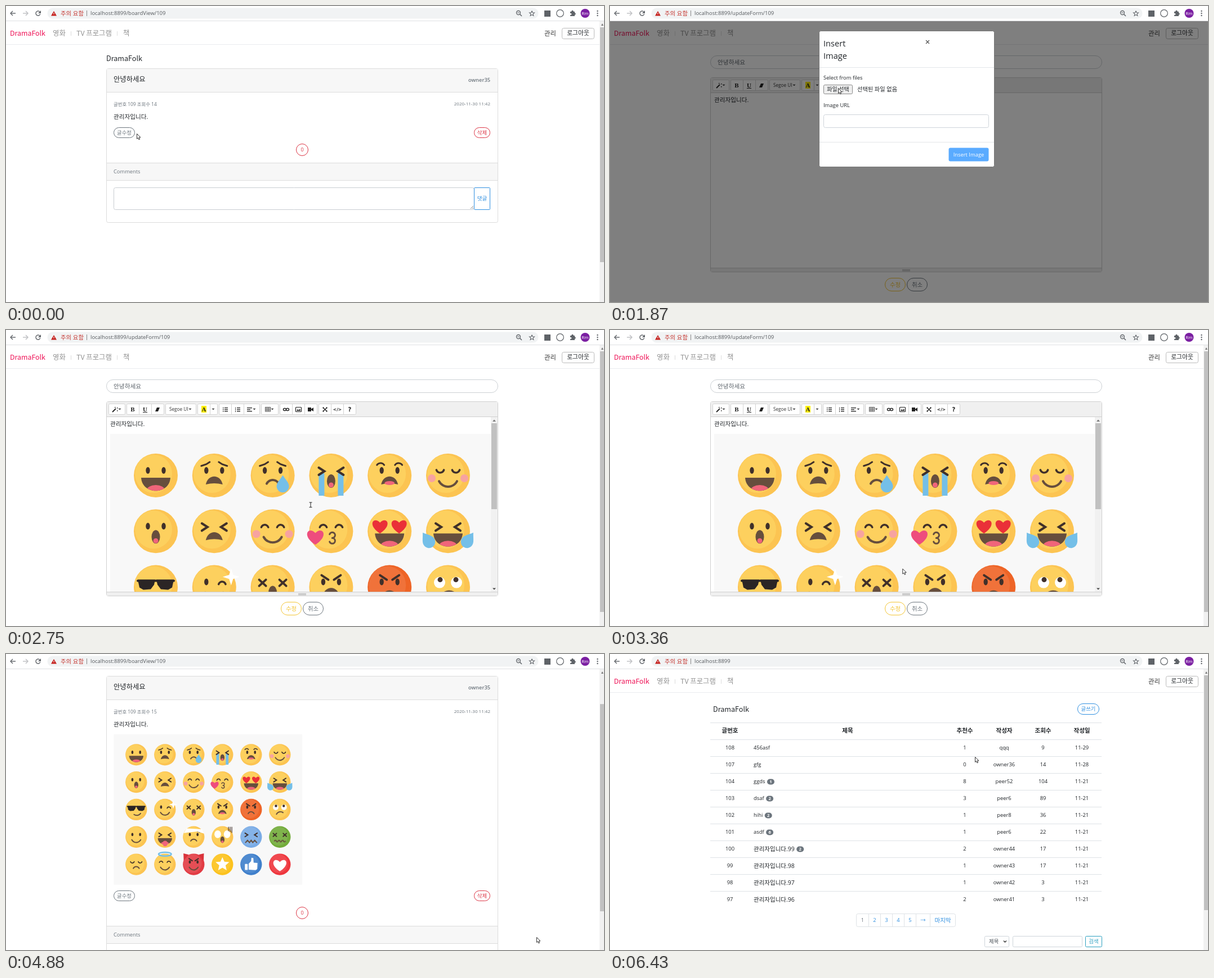
An HTML page with a canvas for the animation above (6.65 s loop, 1062 px wide and 527 px high).

```html
<!DOCTYPE html>
<html lang="ko">
<head>
<meta charset="utf-8">
<title>게시판</title>
<style>
html,body{margin:0;width:100%;height:100%;overflow:hidden;background:#fff}
canvas{display:block;width:100vw;height:100vh}
</style>
</head>
<body>
<canvas id="stage" width="1062" height="527"></canvas>
<script>
const c = document.getElementById('stage').getContext('2d');
const LOOP = 6650, BRAND = 'DramaFolk', WRITER = 'owner35';
const CJK = '"Noto Sans CJK KR","Noto Sans CJK JP","Noto Sans CJK",sans-serif';
const SANS = '"Open Sans",' + CJK;
const INK = '#212529', GREY = '#6c757d', RED = '#dc3545', BLUE = '#2f8fe0', EDGE = '#dcdcdc', GOLD = '#f3c534';

// ---- drawing helpers ----
function txt(s, x, y, size, col = INK, align = 'left', weight = 400, font = SANS) {
  c.font = `${weight} ${size}px ${font}`;
  c.textAlign = align;
  c.fillStyle = col;
  c.fillText(s, x, y + size * .36);
}
function rect(x0, y0, x1, y1, col) { c.fillStyle = col; c.fillRect(x0, y0, x1 - x0, y1 - y0); }
function box(x0, y0, x1, y1, r, fill, stroke, w = 1) {
  c.beginPath();
  c.roundRect(x0 + .5, y0 + .5, x1 - x0 - 1, y1 - y0 - 1, r);
  if (fill) { c.fillStyle = fill; c.fill(); }
  if (stroke) { c.strokeStyle = stroke; c.lineWidth = w; c.stroke(); }
}
function trace(p) {
  c.beginPath();
  for (let i = 0; i < p.length; i += 2) c.lineTo(p[i], p[i + 1]);
}
function line(col, w, ...p) { trace(p); c.strokeStyle = col; c.lineWidth = w; c.stroke(); }
function poly(col, ...p) { trace(p); c.closePath(); c.fillStyle = col; c.fill(); }
function ell(x, y, rx, ry, col) { c.beginPath(); c.ellipse(x, y, rx, ry, 0, 0, 7); c.fillStyle = col; c.fill(); }
function arc(x, y, r, a, b, col, w) {
  c.beginPath(); c.arc(x, y, r, a * Math.PI, b * Math.PI);
  c.strokeStyle = col; c.lineWidth = w; c.stroke();
}
function at(x, y, k, f) { c.save(); c.translate(x, y); c.scale(k, k); f(); c.restore(); }
function caret(x, y, col = '#333', s = 2.5) { poly(col, x - s, y - s / 2, x + s, y - s / 2, x, y + s / 2); }
function pill(s, x0, y0, x1, y1, size, col, r = 99) {
  box(x0, y0, x1, y1, r, '#fff', col);
  txt(s, (x0 + x1) / 2, (y0 + y1) / 2, size, col, 'center');
}
function shadow(f, blur = 8) { c.save(); c.shadowColor = 'rgba(0,0,0,.4)'; c.shadowBlur = blur; c.shadowOffsetY = 2; f(); c.restore(); }

// Values eased between [time, value...] keys
function track(keys, t) {
  let i = keys.length - 1;
  while (i > 0 && keys[i][0] > t) i--;
  const a = keys[i], b = keys[i + 1] || a;
  const u = b === a ? 0 : Math.max(0, (t - a[0]) / (b[0] - a[0]));
  const e = u * u * (3 - 2 * u);
  return a.slice(1).map((v, n) => v + (b[n + 1] - v) * e);
}
const within = (t, ...spans) => spans.some(([a, b]) => t >= a && t < b);

// ---- emoji sheet ----
const EYE = '#40302a', MOUTH = '#664e3d', PINK = '#f0657a', TEAR = '#74bfe8';
function pair(f) { for (const s of [-1, 1]) { c.save(); c.scale(s, 1); f(); c.restore(); } }
function heart(x, y, s, col) {
  at(x, y, s, () => {
    c.beginPath(); c.moveTo(0, 1);
    c.bezierCurveTo(-2, -.3, -.9, -1.6, 0, -.6);
    c.bezierCurveTo(.9, -1.6, 2, -.3, 0, 1);
    c.fillStyle = col; c.fill();
  });
}
function drop(x, y, s, tilt = 0) {
  at(x, y, s, () => {
    c.rotate(tilt);
    c.beginPath(); c.moveTo(0, -1.6);
    c.bezierCurveTo(.5, -.8, 1, -.4, 1, .2);
    c.arc(0, .2, 1, 0, Math.PI);
    c.bezierCurveTo(-1, -.4, -.5, -.8, 0, -1.6);
    c.fillStyle = TEAR; c.fill();
  });
}
function spikes(n, r1, r2) {
  const p = [];
  for (let i = 0; i <= 2 * n; i++) {
    const a = i * Math.PI / n - Math.PI / 2, r = i % 2 ? r2 : r1;
    p.push(Math.cos(a) * r, Math.sin(a) * r);
  }
  return p;
}
function star(n, r1, r2, col) { poly(col, ...spikes(n, r1, r2)); }
const part = {
  dot() { pair(() => ell(14, -9, 3.7, 6, EYE)); },
  squint() { pair(() => line(EYE, 4, 22, -14, 12, -7.5, 22, -1)); },
  hat() { pair(() => arc(14, -5, 6.5, 1.1, 1.9, EYE, 3.5)); },
  lid() { pair(() => arc(14, -12, 7, .1, .9, EYE, 3.5)); },
  cross() { pair(() => { line(EYE, 4, 12, -13, 24, -2); line(EYE, 4, 24, -13, 12, -2); }); },
  wink() { ell(-14, -9, 3.7, 6, EYE); arc(14, -3, 6.5, 1.1, 1.9, EYE, 3.5); },
  worry() { pair(() => line(EYE, 3, 8, -24, 14, -20, 23, -17)); },
  raise() { pair(() => arc(16, -14, 8, 1.2, 1.8, EYE, 3)); },
  anger() { pair(() => line(EYE, 4, 5, -13, 17, -21)); },
  roll() { pair(() => { ell(15, -8, 10, 10, '#fff'); ell(14, -13, 4.5, 4.5, EYE); }); },
  hearts() { pair(() => heart(17, -8, 12, '#ea3038')); },
  grin() {
    c.save(); c.beginPath(); c.moveTo(-26, 4);
    c.bezierCurveTo(-24, 35, 24, 35, 26, 4); c.clip();
    rect(-27, 3, 27, 30, MOUTH); ell(0, 26, 16, 9, PINK);
    c.restore();
  },
  dome() {
    c.beginPath(); c.moveTo(-15, 16);
    c.bezierCurveTo(-11, -3, 11, -3, 15, 16);
    c.quadraticCurveTo(0, 12, -15, 16); c.fillStyle = MOUTH; c.fill();
  },
  tongue() { ell(0, 13.5, 9, 3.5, PINK); },
  o() { ell(0, 10, 7.5, 12, MOUTH); ell(0, 17, 4.5, 4.5, PINK); },
  smile() { arc(0, 2, 18, .15, .85, MOUTH, 4); },
  frown() { arc(0, 20, 12, 1.15, 1.85, MOUTH, 4); },
  smirk() { arc(2, 4, 17, .2, .7, MOUTH, 4); },
  slant() { arc(2, 24, 16, 1.15, 1.7, MOUTH, 4); },
  kiss() { arc(2, 7, 5, 1.1, 2.5, MOUTH, 3); arc(2, 17, 5, 1.5, 2.9, MOUTH, 3); heart(-28, 11, 13, '#ee4d7d'); },
  lick() { part.grin(); box(-8, 13, 9, 34, 8, PINK); },
  zig() { line(MOUTH, 4, -20, 20, -13, 12, -6, 20, 0, 12, 6, 20, 13, 12, 20, 20); },
  wave() { for (const i of [-1, 0, 1]) { arc(i * 13 - 3, 15, 3.3, 1, 2, MOUTH, 3.5); arc(i * 13 + 3.4, 15, 3.3, 0, 1, MOUTH, 3.5); } },
  cheeks() { pair(() => ell(29, 5, 7, 7, '#f7a3a0')); },
  tear() { drop(18, 17, 11); },
  drops() { pair(() => drop(35, 17, 11, .6)); },
  streams() { pair(() => rect(12, -4, 22, 36, TEAR)); },
  shades() { line('#2b2525', 4, -32, -11, 32, -11); pair(() => poly('#2b2525', 1, -13, 32, -13, 29, 1, 22, 5, 9, 4, 3, -4)); },
  sparkle() { at(30, -18, 1, () => star(4, 15, 5, '#fff')); },
  band() { poly('#fff', -36, -14, -26, -31, 30, -28, 38, -12, 12, -20); },
  scream() { pair(() => ell(17, -10, 12, 14, '#fff')); },
  lines() { for (const i of [0, 1, 2]) line(EYE, 2.5, 22 + i * 6, -36, 22 + i * 6, -22 + i * 3); },
  halo() { c.beginPath(); c.ellipse(0, -37, 23, 7, 0, 0, 7); c.strokeStyle = TEAR; c.lineWidth = 5; c.stroke(); },
  horns() { pair(() => poly('#d9333b', 18, -35, 37, -40, 36, -14)); },
  star() { star(5, 26, 12, '#fff'); },
  thumb() { box(-23, -2, -12, 21, 2, '#fff'); poly('#fff', -9, -2, 0, -12, 1, -24, 8, -23, 9, -6, 23, -5, 22, 17, 16, 21, -9, 19); },
  love() { heart(0, 4, 21, '#fff'); }
};
const FACES = `dot grin,worry dot dome,worry dot frown tear,streams squint o,raise dot dome tongue,lid smile cheeks
dot o,squint dome,hat smile cheeks,hat kiss,hearts grin,squint grin drops
shades smirk,wink smile sparkle,cross o,anger dot dome tongue,#ee6426 anger dot frown,roll slant
dot smile,squint lick,worry dot frown band,scream o lines,#79abe6 squint zig,#72ab3a cross wave
lid frown,hat smile halo,#e23c44 horns anger dot smile,#fcc21d star,#3f7fcb thumb,#ee363d love`
  .split('\n').map(row => row.split(',').map(f => f.trim().split(' ')));

function sheet(x, y, k) {
  at(x, y, k, () => {
    rect(0, 0, 681, 545, '#f8f8f8');
    FACES.forEach((row, j) => row.forEach((face, i) => at(81 + i * 103.8, 74 + j * 99.3, 1, () => {
      const tint = face[0][0] === '#';
      ell(0, 0, 39, 39, tint ? face[0] : '#fcc452');
      ell(-4, -3, 33, 34, tint ? 'rgba(255,255,255,.09)' : '#fdd05e');
      c.lineCap = 'round';
      face.slice(tint ? 1 : 0).forEach(p => part[p]());
      c.lineCap = 'butt';
    })));
  });
}

// ---- browser ----
function bar(url, loading) {
  rect(0, 0, 1062, 26, '#fff');
  rect(0, 26, 1062, 27, '#dfe1e3');
  box(73, 3, 946, 23, 10, '#f1f3f4');
  const ic = '#5f6368';
  line(ic, 1.4, 17, 13, 8, 13); line(ic, 1.4, 12, 9, 8, 13, 12, 17);
  line('#bcbec1', 1.4, 30, 13, 39, 13); line('#bcbec1', 1.4, 35, 9, 39, 13, 35, 17);
  if (loading) { line(ic, 1.5, 53, 9, 61, 17); line(ic, 1.5, 61, 9, 53, 17); }
  else { arc(57, 13, 4, .1, 1.75, ic, 1.4); poly(ic, 62, 8, 62, 13, 57, 13); }
  poly('#c5221f', 85, 9, 90, 17.5, 80, 17.5);
  rect(84.5, 12, 85.5, 15, '#fff');
  txt('주의 요함', 97, 13, 10.4, '#c5352f');
  rect(143, 8, 144, 18, '#888');
  txt(url, 150, 13, 9.45, '#55595d');
  arc(910, 12, 3.5, 0, 2, ic, 1.3); line(ic, 1.5, 912.5, 14.5, 916, 18); line(ic, 1, 908, 12, 912, 12);
  at(934, 13.5, .24, () => line(ic, 4.5, ...spikes(5, 20, 9)));
  rect(956, 8, 967, 19, ic);
  arc(984, 13, 6.3, 0, 2, ic, 1.2);
  rect(1002, 10, 1010, 18, ic); ell(1006, 9.5, 1.8, 1.8, ic); ell(1010, 14, 1.8, 1.8, ic);
  ell(1003, 14.5, 1.4, 1.4, '#fff');
  ell(1028.5, 13, 8, 8, '#7b1fa2');
  txt('Rm', 1028.5, 13, 8, '#fff', 'center');
  for (const y of [9, 13, 17]) ell(1050.5, y, 1.2, 1.2, ic);
}
function scrollbar(top, bottom) {
  rect(1054, 27, 1062, 527, '#f1f1f1');
  poly('#777', 1057, 35, 1061, 35, 1059, 31);
  rect(1055, top, 1062, bottom, '#c1c1c1');
}
function header() {
  txt(BRAND, 7, 49, 12.4, '#ee1155', 'left', 500, CJK);
  const nav = (s, x) => txt(s, x, 49, 12.4, '#939393', 'left', 500, CJK);
  nav('영화', 83); nav('TV 프로그램', 125); nav('책', 208);
  rect(115, 45, 116, 53, '#ddd'); rect(197, 45, 198, 53, '#ddd');
  txt('관리', 956, 49, 11.3, '#333', 'left', 400, CJK);
  box(987, 39, 1045, 59, 3, '#fff', '#bababa');
  txt('로그아웃', 1016, 48.5, 10.8, INK, 'center', 500, CJK);
  rect(0, 68, 1062, 69, '#e9ecef');
}

// ---- pages ----
function post(views, hasImage) {
  const d = hasImage ? 277 : 0;
  txt(BRAND, 178, 93, 12.6, INK, 'left', 500, CJK);
  box(178, 111, 874, 386 + d, 3, '#fff', EDGE);
  rect(179, 112, 873, 153, '#f7f7f7'); rect(179, 153, 873, 154, EDGE);
  txt('안녕하세요', 191, 131, 12.3);
  txt(WRITER, 860, 131.5, 9.3, GREY, 'right', 600);
  txt('글번호 109 조회수 ' + views, 191, 174.5, 8.4, GREY);
  txt('2020-11-30 11:42', 860, 174.5, 8, GREY, 'right');
  txt('관리자입니다.', 191, 197, 10.6);
  if (hasImage) sheet(191.5, 215, .4914);
  pill('글수정', 191, 216 + d, 229, 235 + d, 9.4, GREY);
  pill('삭제', 831, 216 + d, 860, 235 + d, 9.4, RED);
  pill('0', 515, 245 + d, 537, 267 + d, 9, RED);
  rect(179, 279 + d, 873, 310 + d, '#f7f7f7');
  rect(178, 279 + d, 874, 280 + d, EDGE); rect(178, 310 + d, 874, 311 + d, EDGE);
  txt('Comments', 191, 295 + d, 9.3, GREY);
  box(191, 323 + d, 832, 363 + d, 3, '#fff', '#c8cdd2');
  line('#888', 1, 825, 361 + d, 830, 356 + d); line('#888', 1, 828, 361 + d, 830, 359 + d);
  pill('댓글', 831, 323 + d, 860, 363 + d, 9.6, BLUE, 1);
}

function toolbar() {
  const groups = [[182, 211], [214, 236, 258, 280], [283, 337], [340, 362, 375], [378, 400, 422, 450],
    [453, 483], [486, 508, 530, 552], [555, 577, 599, 621]];
  for (const g of groups) {
    box(g[0], 131, g[g.length - 1] + 1, 151, 2, '#fff', '#d3d3d3');
    g.slice(1, -1).forEach(x => rect(x, 132, x + 1, 150, '#d3d3d3'));
  }
  const k = '#222', serif = '"Liberation Serif",serif', mono = '"DejaVu Sans",sans-serif';
  line(k, 1.8, 189, 146, 195, 140);
  for (const [x, y] of [[193, 137], [197, 138], [197, 143]]) rect(x, y, x + 1.5, y + 1.5, k);
  caret(202, 141);
  txt('B', 225, 141.5, 11, k, 'center', 700, serif);
  txt('U', 247, 141, 11, k, 'center', 700, serif); rect(243, 146, 251, 147, k);
  poly(k, 265, 145, 268, 138, 273, 138, 270, 145);
  txt('Segoe UI', 290, 141, 8.2, '#333'); caret(327, 141);
  rect(347, 135, 356, 147, '#ffee00'); txt('A', 351.5, 141.5, 11, k, 'center', 700, serif);
  caret(368, 141);
  for (const y of [138, 141, 144]) {
    rect(385, y, 386.5, y + 1.5, k); rect(388, y, 394, y + 1.3, k);
    rect(407, y, 408, y + 2, k); rect(410, y, 416, y + 1.3, k);
    rect(428, y, y === 141 ? 434 : 437, y + 1.3, k);
  }
  caret(441, 141);
  for (const i of [0, 1, 2, 3]) { rect(460, 137 + i * 2.5, 470, 138 + i * 2.5, '#555'); rect(460 + i * 3, 137, 461 + i * 3, 145, '#555'); }
  caret(473, 141);
  box(492, 139, 498, 144, 2.5, null, k, 1.4); box(497, 139, 503, 144, 2.5, null, k, 1.4);
  box(514, 137, 525, 146, 1, null, k, 1.2); poly(k, 516, 144, 518, 141, 520, 143, 522, 140, 523, 144);
  rect(536, 138, 542, 145, k); poly(k, 541, 141.5, 546, 138, 546, 145);
  line(k, 1.2, 563, 138, 570, 145); line(k, 1.2, 570, 138, 563, 145);
  for (const [x, y] of [[562.5, 137.5], [568.5, 137.5], [562.5, 143.5], [568.5, 143.5]]) rect(x, y, x + 2, y + 2, k);
  txt('</>', 588.5, 141, 7.5, k, 'center', 700, mono);
  txt('?', 610.5, 141, 10, k, 'center', 700, mono);
}
function form(scale, focus) {
  box(178, 88, 874, 112, 12, '#fff', '#ccd0d4');
  txt('안녕하세요', 191, 100, 10.7, '#5d646b');
  box(178, 127, 874, 474, 3, '#fff', '#cfcfcf');
  rect(179, 128, 873, 154, '#f0f0f0'); rect(179, 154, 873, 155, '#cfcfcf');
  toolbar();
  txt('관리자입니다.', 185, 167.5, 10.6);
  if (scale) {
    c.save();
    c.beginPath(); c.rect(179, 155, 682, 312); c.clip();
    sheet(185, 185, scale);
    c.restore();
    rect(861, 155, 873, 467, '#f1f1f1');
    rect(862, 166, 872, scale === 1 ? 319 : 453, '#c1c1c1');
    poly('#777', 864, 163, 870, 163, 867, 159.5);
    caret(867, 461, '#444', 3);
  }
  rect(179, 467, 873, 473, '#f0f0f0'); rect(179, 466, 873, 467, '#cfcfcf');
  rect(519, 469, 533, 470, '#aaa'); rect(519, 471, 533, 472, '#aaa');
  if (focus) box(486, 483, 526, 509, 13, null, '#fbdc79', 3);
  pill('수정', 488, 484, 525, 508, 10.4, GOLD);
  pill('취소', 527, 484, 564, 508, 10.4, GREY);
}

const ROWS = `108|456asf||1|qqq|9|11-29
107|gfg||0|owner36|14|11-28
104|ggds|1|8|peer52|104|11-21
103|dsaf|2|3|peer6|89|11-21
102|hihi|2|1|peer8|36|11-21
101|asdf|6|1|peer6|22|11-21
100|관리자입니다.99|2|2|owner44|17|11-21
99|관리자입니다.98||1|owner43|17|11-21
98|관리자입니다.97||1|owner42|3|11-21
97|관리자입니다.96||2|owner41|3|11-21`.split('\n').map(r => r.split('|'));
function list() {
  const cols = [213, 422, 0, 630, 700, 769, 838];
  txt(BRAND, 183, 98, 12.6, INK, 'left', 500, CJK);
  pill('글쓰기', 830, 88, 869, 108, 9.4, BLUE);
  ['글번호', '제목', '', '추천수', '작성자', '조회수', '작성일'].forEach((s, i) => txt(s, cols[i], 136.5, 10.6, INK, 'center', 700));
  rect(178, 122, 873, 123, '#dee2e6');
  ROWS.forEach((r, j) => {
    const y = 167 + j * 30;
    rect(178, y - 15, 873, y - 14, '#dee2e6');
    r.forEach((s, i) => { if (i !== 1 && i !== 2) txt(s, cols[i], y, 9.4, INK, 'center'); });
    txt(r[1], 255, y, j > 5 ? 10.5 : 9.4);
    if (r[2]) {
      const x = 258 + c.measureText(r[1]).width;
      box(x, y - 5, x + 14, y + 6, 6, GREY);
      txt(r[2], x + 7, y + .5, 7.6, '#fff', 'center', 700);
    }
  });
  const edges = [437, 459, 480, 501, 522, 543, 568, 613];
  box(437, 462, 614, 486, 3, '#fff', '#dee2e6');
  ['1', '2', '3', '4', '5', '→', '마지막'].forEach((s, i) => {
    if (i) rect(edges[i], 463, edges[i] + 1, 485, '#dee2e6');
    txt(s, (edges[i] + edges[i + 1] + 1) / 2, 474, i > 5 ? 10.6 : 9.4, i ? BLUE : GREY, 'center');
  });
  box(665, 502, 709, 522, 2, '#fff', '#ced4da');
  txt('제목', 673, 512, 9.4, '#495057');
  line('#333', 1.4, 699, 510.5, 701.5, 513, 704, 510.5);
  box(715, 502, 839, 522, 2, '#fff', '#ced4da');
  pill('검색', 844, 502, 874, 522, 9.4, '#2a9fc0', 2);
}

// ---- overlays ----
function modal(m, focus) {
  rect(0, 27, 1062, 527, `rgba(0,0,0,${m * .5})`);
  c.save();
  c.globalAlpha = m;
  c.translate(0, (m - 1) * 20);
  box(371, 44, 683, 287, 3, '#fff', '#777');
  txt('Insert', 379, 67, 14.6, INK, 'left', 500);
  txt('Image', 379, 89, 14.6, INK, 'left', 500);
  line('#555', 1.3, 561, 61, 567, 67); line('#555', 1.3, 567, 61, 561, 67);
  rect(372, 109, 682, 110, '#e3e6e9');
  txt('Select from files', 379, 128, 9.4);
  box(379, 140, 431, 157, 2, '#efefef', '#888');
  txt('파일 선택', 405, 148.5, 10, INK, 'center');
  txt('선택된 파일 없음', 510, 148.5, 10.2, INK, 'right');
  txt('Image URL', 379, 177, 9.4);
  if (focus) box(377, 191, 675, 219, 4, null, '#bfdcff', 3);
  box(379, 193, 673, 217, 3, '#fff', focus ? '#80bdff' : '#ced4da');
  rect(372, 242, 682, 243, '#e3e6e9');
  box(601, 252, 673, 277, 3, '#5aabff');
  txt('Insert Image', 637, 264.5, 9.4, '#fff', 'center');
  c.restore();
}
function page(x, y) { box(x - 4, y - 5, x + 4, y + 6, 0, '#fff', '#999'); }
function picker(alpha) {
  c.save();
  c.globalAlpha = alpha;
  shadow(() => rect(32, 25, 466, 352, '#fbfbfa'), 10);
  box(31, 24, 467, 353, 0, null, '#777');
  rect(32, 25, 466, 45, '#fff');
  ell(42, 34.5, 5, 5, '#db4437');
  txt('열기', 51, 34.5, 9);
  line('#333', 1.1, 451, 31, 458, 38); line('#333', 1.1, 458, 31, 451, 38);
  for (const y of [45, 73]) {
    rect(32, y, 466, y + 22, '#edf2f3');
    box(448, y + 7, 459, y + 15, 0, '#fff', '#5b7f9c'); rect(454, y + 8, 458, y + 14, '#4aa0dc');
    line('#777', 1, 250, y + 25, 253, y + 22.5, 256, y + 25);
  }
  rect(355, 67, 356, 73, '#e5e5e5'); rect(355, 95, 356, 113, '#e5e5e5');
  txt('이름', 155, 104, 9.3, '#555'); txt('수정한 날짜', 360, 104, 9.3, '#555');
  txt('작업 중...', 303, 129, 9.3, '#666');
  rect(32, 95, 129, 296, '#fff'); rect(129, 95, 140, 296, '#f0f0f0');
  rect(129, 107, 140, 262, '#cdcdcd');
  line('#444', 1.3, 132, 103, 134.5, 100, 137, 103); line('#444', 1.3, 132, 289, 134.5, 292, 137, 289);
  at(55, 115, .19, () => star(5, 26, 12, '#3c94d8'));
  txt('바로 가기', 63, 114.5, 9.3);
  ['바탕 화면', '내 PC', '다운로드', 'bin', 'bin', 'dramaFolk', '사진', '증명서-pdf'].forEach((s, i) => {
    const y = 131 + i * 16.7;
    page(60, Math.round(y)); txt(s, 68, y, 9.2);
    if (i < 4) { line('#777', 2, 122, y + 1, 126, y - 3); line('#777', 1, 120, y + 3, 123, y); }
  });
  txt('FogShelf', 63, 270.5, 8.6);
  rect(32, 284, 129, 296, '#d9d9d9');
  poly('#3c8fd0', 52, 288, 60, 290, 60, 296, 54, 294);
  txt('내 PC', 63, 292, 9.3);
  rect(155, 285, 455, 296, '#f0f0f0'); rect(155, 286, 353, 295, '#c9c9c9');
  rect(32, 296, 466, 352, '#efefef');
  for (const [x0, y0, x1, y1] of [[125, 309, 175, 320], [179, 306, 315, 323], [323, 327, 384, 345], [393, 327, 454, 345], [455, 341, 466, 352]]) rect(x0, y0, x1, y1, '#fcfcfc');
  box(323, 307, 454, 323, 0, '#e3e3e3', '#b0b0b0');
  txt('이미지 파일 (*.xbm;*.tif;*.pjp;*.s', 326, 315, 8.2);
  line('#555', 1, 445, 313.5, 448, 316.5, 451, 313.5);
  c.restore();
}
function notice(msg) {
  shadow(() => box(380, 25, 683, 127, 4, '#fff'));
  txt('localhost:8899 내용:', 392, 44, 10.4, '#202124');
  txt(msg, 392, 69, 9.6, '#5f6368');
  box(634, 98, 673, 118, 3, '#1a73e8');
  txt('확인', 653.5, 108, 9.2, '#fff', 'center');
}
function pointer(x, y, kind, edge) {
  at(x, y, 1, () => {
    if (kind === 'text') {
      line('#222', 1, -2.5, -4, 2.5, -4); line('#222', 1, 0, -4, 0, 4.5); line('#222', 1, -2.5, 4.5, 2.5, 4.5);
      return;
    }
    const p = kind === 'hand'
      ? [0, 0, 2, 0, 2, 5, 7, 6, 8, 8, 7, 13, 1, 13, -3, 8, -2, 7, 0, 8, 0, 0]
      : [.5, .5, .5, 9.5, 2.6, 7.7, 4, 11, 5.6, 10.2, 4.2, 7, 7, 7, .5, .5];
    poly('#fff', ...p); line(edge, 1, ...p);
  });
}

// ---- timeline ----
const PATH = [[0, 232, 227], [80, 232, 227], [160, 213, 226], [780, 213, 226], [1170, 519, 140], [1350, 519, 140],
  [1400, 500, 158], [1560, 405, 146], [1870, 405, 146], [2280, 324, 239], [2480, 324, 239], [2750, 541, 311],
  [3140, 541, 311], [3520, 506, 494], [4010, 506, 494], [4250, 664, 107], [4710, 664, 107], [4880, 942, 504],
  [4950, 942, 504], [5320, 845, 354], [5800, 845, 354], [6040, 660, 107], [6110, 660, 107], [6400, 648, 183]];
const CLICKS = [[90, 240], [1250, 1350], [1710, 1790], [3700, 3780], [4250, 4330], [5400, 5480], [6040, 6110]];

function draw(t) {
  const scroll = track([[0, 0], [4710, 0], [4880, 72], [4950, 72], [5100, 146]], t)[0] * (t < 5880);
  const m = track([[0, 0], [1350, 0], [1400, 1], [2480, 1], [2680, 0]], t)[0];
  const editing = within(t, [480, 4480]);
  const loading = within(t, [240, 560], [4330, 4560], [5640, 5880], [6200, 6300]);

  rect(0, 0, 1062, 527, '#fff');
  c.save();
  c.translate(0, -scroll);
  header();
  if (editing) form(t < 2680 ? 0 : t < 3450 ? 1 : .4914, t >= 3700);
  else if (t < 5880) post(t < 480 ? 14 : 15, t >= 4480);
  else list();
  c.restore();

  if (m === 0) {
    const top = 38 + scroll * .71;
    scrollbar(top, editing ? 502 : within(t, [4480, 5880]) ? top + 369 : 456);
  }
  if (within(t, [1170, 1350])) {
    poly('#111', 516, 155, 522, 155, 519, 151);
    box(500, 154, 538, 173, 3, '#111');
    txt('Picture', 519, 164, 8.3, '#fff', 'center');
  }
  if (m > 0) modal(m, within(t, [1480, 1710]));
  if (within(t, [1960, 2480])) picker(track([[1960, .5], [2200, .96]], t)[0]);

  const path = t < 320 ? '/boardView/109' : t < 4330 ? '/updateForm/109' : t < 5640 ? '/boardView/109' : '';
  bar('localhost:8899' + path, loading);
  if (within(t, [3840, 4330])) notice('수정되었습니다.');
  if (within(t, [5880, 6180])) notice('삭제되었습니다.');

  const [x, y] = track(PATH, t);
  if (within(t, ...CLICKS)) ell(x, y + 1, 10, 10, 'rgba(245,235,40,.6)');
  const kind = within(t, [90, 320], [1130, 1350], [3500, 3840], [5300, 5480]) ? 'hand' : within(t, [2680, 3200]) ? 'text' : 'arrow';
  pointer(x, y, kind, within(t, [4330, 4480]) ? '#3a9a4a' : '#333');
}
function tick(now) { draw(now % LOOP); requestAnimationFrame(tick); }
draw(0);
requestAnimationFrame(tick);
</script>
</body>
</html>
```
